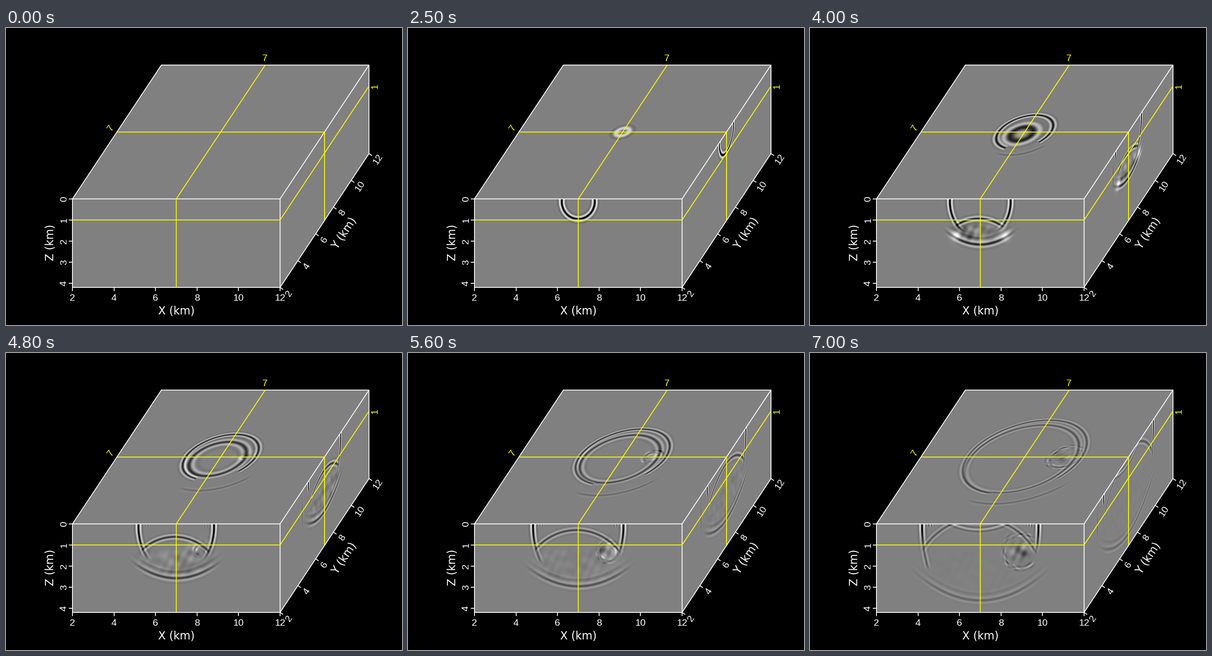
Recreate the animation shown at these times as a matplotlib script. Size 864 by 648 pixels, loop 7100 ms.

```python
import numpy as np
import matplotlib.pyplot as plt
from matplotlib.animation import FuncAnimation
from matplotlib.collections import LineCollection

W, H, DPI = 864, 648, 100
SX, SZ = 45.3, 46.0                      # pixels per km across and down
Y_STEP = np.array([19.4, -29.2])         # pixels per km along the oblique axis
CORNER = np.array([145, 372.8])          # x = 2, y = 2, z = 0
DEPTH = 4.2
SLANT = np.degrees(np.arctan2(-Y_STEP[1], Y_STEP[0]))


def project(x, y, z):
    return CORNER + (x - 2) * np.array([SX, 0]) + (y - 2) * Y_STEP + np.array([0, z * SZ])


# ---------------------------------------------------------------- wave field
def pulse(d, length=0.21, width=0.14):
    return -np.cos(2 * np.pi * d / length) * np.exp(-(d / width) ** 2)


def step(x, width=0.1):
    return 0.5 + 0.5 * np.tanh(x / width)


def ramp(t, start, end):
    return np.clip((t - start) / (end - start), 0, 1)


rng = np.random.default_rng(4)
MODES = rng.normal(0, 7, (8, 5))
SECTOR = np.radians(287)


def haze(u, v, z, t):
    return sum(np.cos(a * u + b * v + c * z + p - w * t) for a, b, c, p, w in MODES) / 4


def direct_wave(d, bearing, u, z, t, late):
    """Expanding shell, cut off where it meets the fast body below."""
    floor = 1.42 + 0.2 * (t - 4) + 2 * (1 - late)
    floor = floor - 0.36 * max(t - 4.8, 0) * step(u, 0.4)
    floor = floor - 1.2 * late * step(bearing - 0.83, 0.06)
    strength = np.maximum(1.45 - 0.15 * t * z, 0.35)
    ripples = (0.5 * ramp(t, 3, 7) * np.cos(2 * np.pi * d / 0.13)
               * np.exp(-(z / 0.13) ** 2 - ((d + 0.4) / 0.18) ** 2))
    return strength * pulse(d) * step(floor - z) + ripples


def reflected_wave(u, v, z, t):
    """Arch rising from the body, and its return from the surface."""
    rise = 2.6 + 0.4 * (t - 5.6)
    side = np.hypot(u + 0.08, v + 0.15)
    up, down = (np.hypot(side, z + sign * 2.89) - rise for sign in (-1, 1))
    gain = ramp(t, 3.3, 3.9) * np.exp(-0.25 * (t - 4)) * 0.75
    return gain * step(1.35 - z) * (pulse(up) - pulse(down))


def transmitted_wave(r, radius, z, t, texture):
    base = (22 * t - 9 + 22 * ramp(t, 2.5, 4.1)) / SZ
    bend = 0.13 + 0.1 * np.exp(4 - t)
    below = (z - base + bend * r ** 2) / np.hypot(1, 2 * bend * r)
    envelope = step(z - 1.25) * np.exp(-(r / radius) ** 6)
    gain = 0.9 * ramp(t, 3, 3.5) * np.exp(-0.4 * (t - 3.5))
    fill = 0.3 * ramp(t, 3.3, 4) * np.exp(4 - t) * texture * step(-below - 0.1)
    front = gain * (pulse(below, 0.26, 0.16) + 0.3 * pulse(below + 0.3, 0.26))
    lobes = (0.7 * np.exp(-((t - 4) / 0.4) ** 2)
             * np.exp(-((r - 0.8 * radius) ** 2 + (z - 1.75) ** 2) / 0.05))
    return envelope * (front + fill) + lobes


def scattered_wave(u, v, z, t, texture):
    """Broken ripples around a point that drifts along x."""
    away = np.sqrt((u - 1 - 0.36 * (t - 4.4)) ** 2 + v ** 2 + (z - 1.3) ** 2)
    ring = pulse(away - 0.15 - 0.25 * (t - 4.3))
    patch = np.exp(-(away / 0.45) ** 2)
    return 0.45 * ramp(t, 4.2, 4.8) * texture * (ring + patch)


def field(u, v, z, t):
    """Pressure at (u, v) km from the source axis, z km deep."""
    r = np.hypot(u, v)
    radius = (20.2 * t - 14.5) / SX
    squash = 1 - 0.075 * max(t - 2, 0)
    d = np.hypot(r, squash * (z - 0.13)) - radius
    bearing = (u * np.cos(SECTOR) + v * np.sin(SECTOR)) / (r + 1e-6)
    late = ramp(t, 3.3, 3.8)
    total = direct_wave(d, bearing, u, z, t, late)
    if t > 3:
        texture = haze(u, v, z, t)
        inside = step(-d)
        total += inside * reflected_wave(u, v, z, t)
        total += transmitted_wave(r, radius, z, t, texture)
        total += inside * scattered_wave(u, v, z, t, texture)
        ahead = r - radius - 0.7 * ramp(t, 3.5, 4.8)
        total += (0.2 * late * step(bearing - 0.83, 0.06) * pulse(ahead, 0.3)
                  * np.exp(-((z - 1) / 0.5) ** 2))
    return total


# ---------------------------------------------------------------- faces
rows, cols = np.mgrid[0:H, 0:W].astype(np.float32) + np.float32(0.5)


def make_face(u, v, z):
    u, v, z = np.broadcast_arrays(u, v, z)
    mask = (abs(u) <= 5) & (abs(v) <= 5) & (z >= 0) & (z <= DEPTH)
    return mask, [a[mask].astype(np.float32) for a in (u, v, z)]


front_x, front_y = project(7, 2, 0)
mid_x, mid_y = project(7, 7, 0)
side_x, side_y = project(12, 7, 0)
top_v = (rows - mid_y) / Y_STEP[1]
side_v = (cols - side_x) / Y_STEP[0]
FACES = [
    make_face((cols - front_x) / SX, np.float32(0), (rows - front_y) / SZ),
    make_face((cols - mid_x - Y_STEP[0] * top_v) / SX, top_v, np.float32(1)),
    make_face(np.float32(0), side_v, (rows - side_y - Y_STEP[1] * side_v) / SZ),
]


def render(t):
    picture = np.zeros((H, W), np.float32)
    for mask, points in FACES:
        wave = field(*points, t) if t > 0.15 else 0
        picture[mask] = np.clip(0.502 + 0.5 * wave, 0, 1)
    return picture


# ---------------------------------------------------------------- figure
fig = plt.figure(figsize=(W / DPI, H / DPI), dpi=DPI, facecolor="black")
ax = fig.add_axes([0, 0, 1, 1])
ax.axis("off")
image = ax.imshow(render(0), cmap="gray", vmin=0, vmax=1, extent=(0, W, H, 0),
                  interpolation="nearest", aspect="auto")
ax.set_xlim(0, W)
ax.set_ylim(H, 0)


def path(*points):
    return np.array([project(*p) for p in points])


def label(text, center, angle=0, color="white", size=21, font="Liberation Sans"):
    ax.text(*center, text, color=color, fontsize=size * 72 / DPI, family=font,
            rotation=angle, rotation_mode="anchor", ha="center", va="center_baseline")


white = [
    path((2, 2, 0), (12, 2, 0), (12, 2, DEPTH), (2, 2, DEPTH), (2, 2, 0),
         (2, 12, 0), (12, 12, 0), (12, 2, 0)),
    path((12, 12, 0), (12, 12, DEPTH), (12, 2, DEPTH)),
]
yellow = [
    path((7, 12, 0), (7, 2, 0), (7, 2, DEPTH)),
    path((2, 7, 0), (12, 7, 0), (12, 7, DEPTH)),
    path((2, 2, 1), (12, 2, 1), (12, 12, 1)),
]


def add_tick(value, start, direction, reach, angle=0):
    direction = np.array(direction)
    white.append(np.array([start, start + 8 * direction]))
    label(str(value), start + reach * direction, angle)


outward = np.array([-Y_STEP[1], Y_STEP[0]]) / np.hypot(*Y_STEP)
for value in range(2, 13, 2):
    add_tick(value, project(value, 2, DEPTH), (0, 1), 21.5)
    add_tick(value, project(12, value, DEPTH), outward, 21, SLANT)
for value in range(5):
    add_tick(value, project(2, 2, value), (-1, 0), 20.5, 90)

for name, center, angle in (("X", (371.5, 615), 0), ("Z", (94, 468), 90),
                            ("Y", (736, 446), SLANT)):
    label(f"{name} (km)", center, angle, size=24, font="DejaVu Sans")
label("7", (565, 64.5), color="yellow")
label("7", (227, 217), SLANT, "yellow")
label("1", (803, 127.5), 90, "yellow")

for lines, color in ((white, "white"), (yellow, "yellow")):
    ax.add_collection(LineCollection(lines, colors=color, linewidths=1.8 * 72 / DPI))


def update(index):
    image.set_data(render(index / 10))
    return (image,)


anim = FuncAnimation(fig, update, frames=71, interval=100, repeat=True, repeat_delay=0)
plt.show()
```
